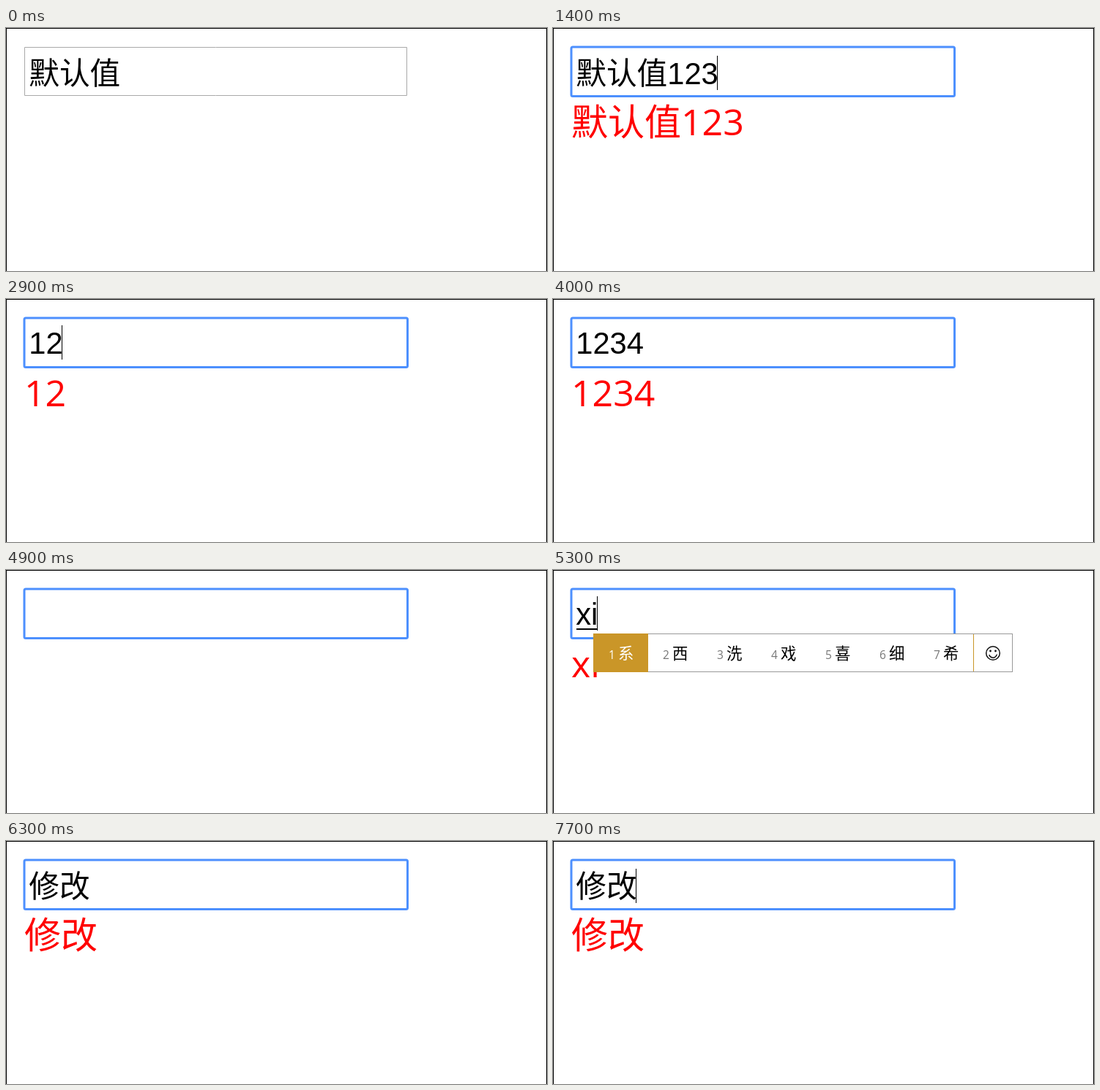
Animation of 739x333 px, one loop 7.9 s. Source, as an HTML page with a canvas:

```html
<!DOCTYPE html>
<html lang="zh-CN">
<head>
<meta charset="utf-8">
<style>
  html, body { margin: 0; width: 100%; height: 100%; overflow: hidden; background: #fff; }
  canvas { display: block; }
</style>
</head>
<body>
<canvas id="stage" width="739" height="333"></canvas>
<script>
const ctx = document.getElementById('stage').getContext('2d');
const LOOP = 7900, TEXT_X = 31.25;
const CJK = '"Noto Sans CJK SC", "Noto Sans CJK", sans-serif';
const FIELD_FONT = '41.67px "Liberation Sans", ' + CJK;
const ECHO_FONT = '50px "Open Sans", ' + CJK;
const INITIAL = '默认值';

// time, field text, options: caret (shown unless false), sel (selection start), ime (candidates)
const steps = [
  [0, INITIAL, { idle: true, caret: false }],
  [700, INITIAL, { noEcho: true }],
  [1000, INITIAL + '1'],
  [1100, INITIAL + '12'],
  [1400, INITIAL + '123'],
  [1700, INITIAL + '1234'],
  [2000, INITIAL + '12345'],
  [2400, INITIAL + '12345', { sel: 2 }],
  [2500, INITIAL + '12345', { sel: 0 }],
  [2700, '1'],
  [2900, '12'],
  [3200, '123'],
  [3500, '1234'],
  [4000, '1234', { caret: false }],
  [4200, '123'],
  [4400, '12'],
  [4600, '1'],
  [4800, ''],
  [4900, '', { caret: false }],
  [5100, 'x', { ime: '想 下 小 新 向 像 先' }],
  [5300, 'xi', { ime: '系 西 洗 戏 喜 细 希' }],
  [5500, 'xiu', { ime: '修 秀 休 绣 羞 袖 朽' }],
  [5600, "xiu'ga", { ime: '修改 绣阁 修 秀 休 绣 羞' }],
  [5700, "xiu'gai", { ime: '修改 修 秀 休 绣 羞 袖' }],
  [5800, '修改'],
  [6300, '修改', { caret: false }],
  [6800, '修改'],
  [7300, '修改', { caret: false }],
  [7700, '修改']
];

function box(x, y, w, h, color) {
  ctx.fillStyle = color;
  ctx.fillRect(x, y, w, h);
}

function label(text, x, y, font, color) {
  ctx.font = font;
  ctx.fillStyle = color;
  ctx.fillText(text, x, y);
}

// x position just after the given field text
function endOf(text) {
  ctx.font = FIELD_FONT;
  return TEXT_X + ctx.measureText(text).width;
}

function drawFrame(idle) {
  ctx.lineWidth = idle ? 1 : 3;
  ctx.strokeStyle = idle ? '#a9a9a9' : '#4d90fe';
  ctx.beginPath();
  if (idle) ctx.rect(25.5, 26.5, 522, 66);
  else ctx.roundRect(25, 26, 523.5, 67.5, 2);
  ctx.stroke();
}

function drawField(text, { caret = true, sel, ime }) {
  const shift = /[^\x00-\x7f]/.test(text) ? 2 : 0;
  const base = 75 + shift, end = endOf(text);
  label(text, TEXT_X, base, FIELD_FONT, '#000');
  if (ime) box(32, 80, end - 33, 2, '#000');
  if (sel !== undefined) {
    const from = Math.round(endOf(text.slice(0, sel)));
    const width = Math.round(end) - from;
    box(from, 38, width, 47, '#3390ff');
    ctx.save();
    ctx.beginPath();
    ctx.rect(from, 38, width, 47);
    ctx.clip();
    label(text, TEXT_X, base, FIELD_FONT, '#fff');
    ctx.restore();
  } else if (caret) {
    box(Math.floor(end - 1), 36 + shift, 1, 47, '#000');
  }
}

function drawSmiley(x, y) {
  ctx.strokeStyle = ctx.fillStyle = '#111';
  ctx.lineWidth = 1.5;
  ctx.beginPath();
  ctx.arc(x, y, 9.3, 0, Math.PI * 2);
  ctx.moveTo(x + 5, y + 2);
  ctx.arc(x, y + 1, 5.2, 0.2, Math.PI - 0.2);
  ctx.stroke();
  ctx.beginPath();
  for (const dx of [-3.5, 3.5]) ctx.arc(x + dx, y - 3, 1.4, 0, Math.PI * 2);
  ctx.fill();
}

function drawCandidates(words, left) {
  const cellWidth = word => 53 + 21 * word.length;
  const split = left + 1 + words.reduce((sum, word) => sum + cellWidth(word), 0);
  const width = split + 54 - left;
  box(left, 87, width, 53, '#999');
  box(left + 1, 88, width - 2, 51, '#fff');
  let x = left + 1;
  words.forEach((word, i) => {
    if (!i) box(left, 87, cellWidth(word) + 1, 53, '#ca9628');
    label(i + 1, x + 20, 122, '15.5px "Open Sans", sans-serif', i ? '#777' : '#fff');
    label(word, x + 33, 122, '21.4px ' + CJK, i ? '#000' : '#fff');
    x += cellWidth(word);
  });
  box(split, 88, 1, 51, '#ca9628');
  drawSmiley(split + 27, 114);
}

function draw(time) {
  const [, text, options = {}] = steps.findLast(step => step[0] <= time);
  box(0, 0, 739, 333, '#fff');
  box(0, 0, 739, 1, '#000');
  box(0, 0, 1, 333, '#000');
  box(738, 0, 1, 333, '#000');
  drawFrame(options.idle);
  drawField(text, options);
  if (!options.idle && !options.noEcho) label(text, 25, 147, ECHO_FONT, '#f00');
  if (options.ime) {
    const left = Math.round(endOf(text.replace("'", '')) - 6);
    drawCandidates(options.ime.split(' '), left);
  }
}

const start = performance.now();
function tick() {
  draw((performance.now() - start) % LOOP);
  requestAnimationFrame(tick);
}
tick();
</script>
</body>
</html>
```
